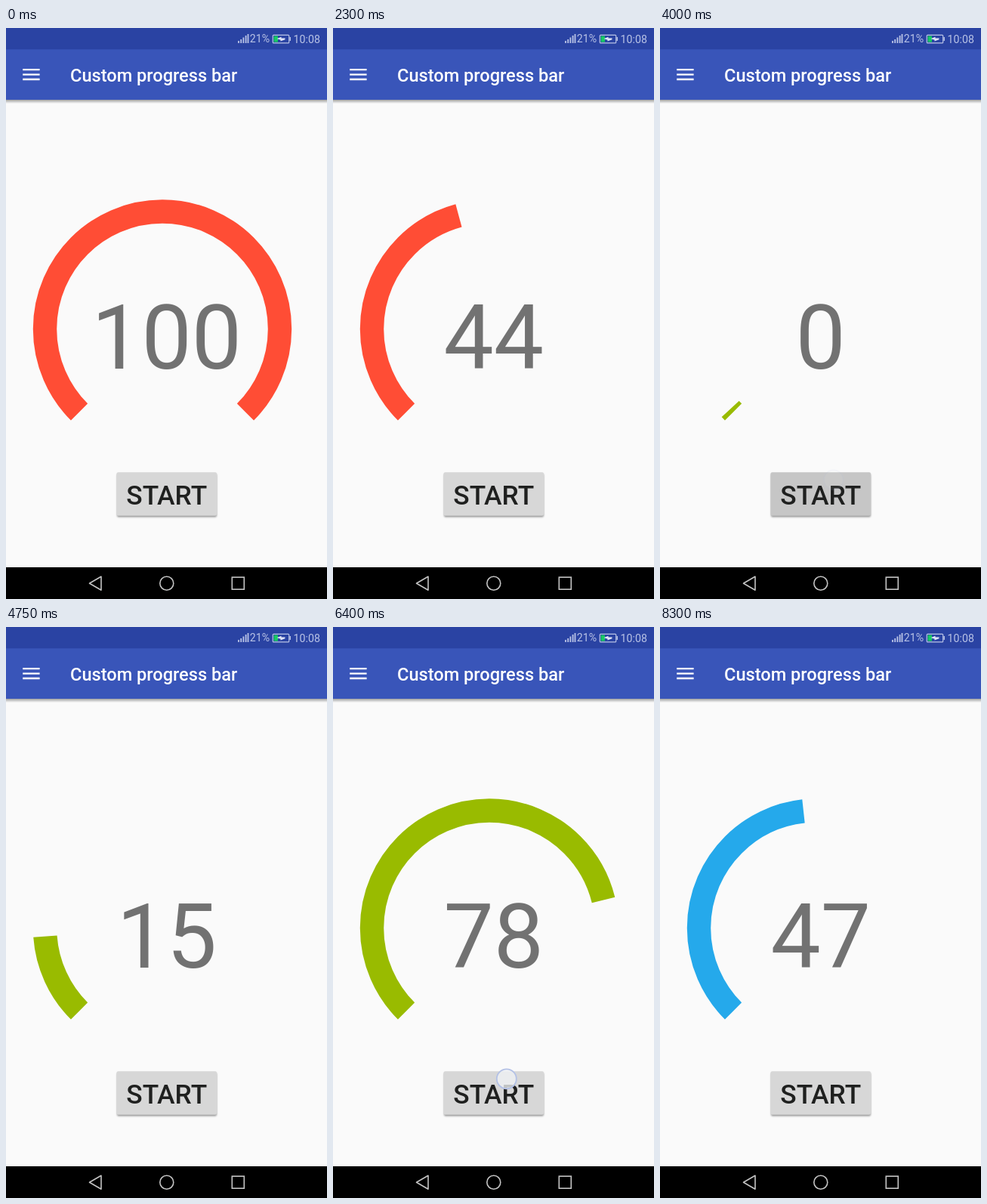
Recreate the animation shown at these times as an HTML page. Size 425 px wide and 756 px high, loop 8350 ms.

```html
<!DOCTYPE html>
<html lang="en">
<head>
<meta charset="utf-8">
<title>Custom progress bar</title>
<style>
  html, body { margin: 0; width: 425px; height: 756px; overflow: hidden; background: #fafafa; }
  svg { display: block; font-family: Roboto, sans-serif; }
  .title { font-size: 23.6px; font-weight: 500; fill: #fff; }
  .status { font-size: 14.2px; fill: #b9c3e6; }
  .value { font-size: 118px; fill: #727272; text-anchor: middle; }
  .label { font-size: 35.4px; font-weight: 500; fill: #1f201f; text-anchor: middle; }
</style>
</head>
<body>
<svg width="425" height="756" viewBox="0 0 425 756">
  <defs>
    <linearGradient id="fade" x2="0" y2="1">
      <stop offset="0" stop-opacity=".36"/>
      <stop offset="1" stop-opacity="0"/>
    </linearGradient>
    <filter id="soft" x="-10%" y="-20%" width="120%" height="140%">
      <feGaussianBlur stdDeviation="1.3"/>
    </filter>
  </defs>

  <rect width="425" height="756" fill="#fafafa"/>
  <rect y="95" width="425" height="5" fill="url(#fade)"/>
  <rect width="425" height="95" fill="#3955b9"/>
  <rect width="425" height="28.3" fill="#2a43a3"/>

  <!-- status bar -->
  <path d="M308 20v-3M311.2 20v-5M314.4 20v-7.5M317.6 20v-10M320.5 20v-12" stroke="#b9c3e6" stroke-width="1.8"/>
  <text class="status" x="322.7" y="19.4">21%</text>
  <rect x="353.3" y="9.3" width="21.4" height="10.6" rx="1" fill="none" stroke="#b9c3e6" stroke-width="1.2"/>
  <rect x="354.6" y="10.6" width="5.4" height="8" fill="#17c964"/>
  <path d="M376.2 12v5" stroke="#b9c3e6" stroke-width="1.6"/>
  <path d="M358.5 14.2l6-2.4v1.8h5v1.6l-6 2.3v-1.8z" fill="#dfe5f7"/>
  <text class="status" x="380.6" y="19.8">10:08</text>

  <!-- toolbar -->
  <path d="M22.2 55.2h22.4M22.2 61.6h22.4M22.2 68h22.4" stroke="#fff" stroke-width="2.3"/>
  <text class="title" x="85" y="70.6">Custom progress bar</text>

  <path id="arc" d="M97.04 508.46A155.5 155.5 0 1 1 316.96 508.46" pathLength="100" fill="none" stroke-width="31.4"/>
  <text id="value" class="value" x="212.7" y="450.5"></text>

  <rect x="147" y="590" width="132" height="57.5" rx="2" opacity=".4" filter="url(#soft)"/>
  <rect id="button" x="146.5" y="588.3" width="132.5" height="57.5" rx="2"/>
  <text class="label" x="212.8" y="631.3">START</text>
  <circle id="touch" cx="229.8" cy="598.3" r="13" fill="#f0f2f5" fill-opacity=".78" stroke="#b3c1e6" stroke-width="1.8"/>

  <!-- navigation bar -->
  <rect y="714" width="425" height="42"/>
  <g fill="none" stroke="#c4c4c4" stroke-width="1.6">
    <path d="M110.5 735.3L126 726.3V744.3Z" stroke-linejoin="round"/>
    <circle cx="212.8" cy="735.2" r="9"/>
    <rect x="299.3" y="727.2" width="16" height="16"/>
  </g>
</svg>
<script>
  const LOOP = 8350, STEP = 50, DURATION = 3780, LEAD = 20;
  const RED = '#ff4d35';
  const runs = [
    { start: 545, color: RED },
    { start: 3788, color: '#99bb00' },
    { start: 6466, color: '#25a9eb' }
  ];
  const [arc, value, button, touch] =
    ['arc', 'value', 'button', 'touch'].map(id => document.getElementById(id));

  const clamp = x => Math.min(1, Math.max(0, x));
  const ease = x => (1 - Math.cos(Math.PI * clamp(x))) / 2;
  // Rises from a to b, holds, falls from c to d.
  const pulse = (t, a, b, c, d) => Math.min(clamp((t - a) / (b - a)), clamp((d - t) / (d - c)));

  function draw(t) {
    const run = runs.filter(r => t >= r.start - LEAD).pop();
    const progress = run ? ease((t - run.start) / DURATION) * 100 : 100;
    arc.setAttribute('stroke', run ? run.color : RED);
    arc.setAttribute('stroke-dasharray', progress >= 100 ? 'none' : `${progress} 300`);
    value.textContent = Math.floor(progress);

    let press = 0, dot = 0;
    for (const { start } of runs) {
      press = Math.max(press, pulse(t, start - 60, start + 60, start + 215, start + 380));
      dot = Math.max(dot, pulse(t, start - 120, start - 80, start + 30, start + 230));
    }
    const shade = Math.round(215 - 17 * press);
    button.setAttribute('fill', `rgb(${shade},${shade},${shade})`);
    touch.setAttribute('opacity', dot);
  }

  const origin = performance.now();
  function tick() {
    const t = (performance.now() - origin) % LOOP;
    draw(Math.floor(t / STEP) * STEP);
    requestAnimationFrame(tick);
  }
  tick();
</script>
</body>
</html>
```
